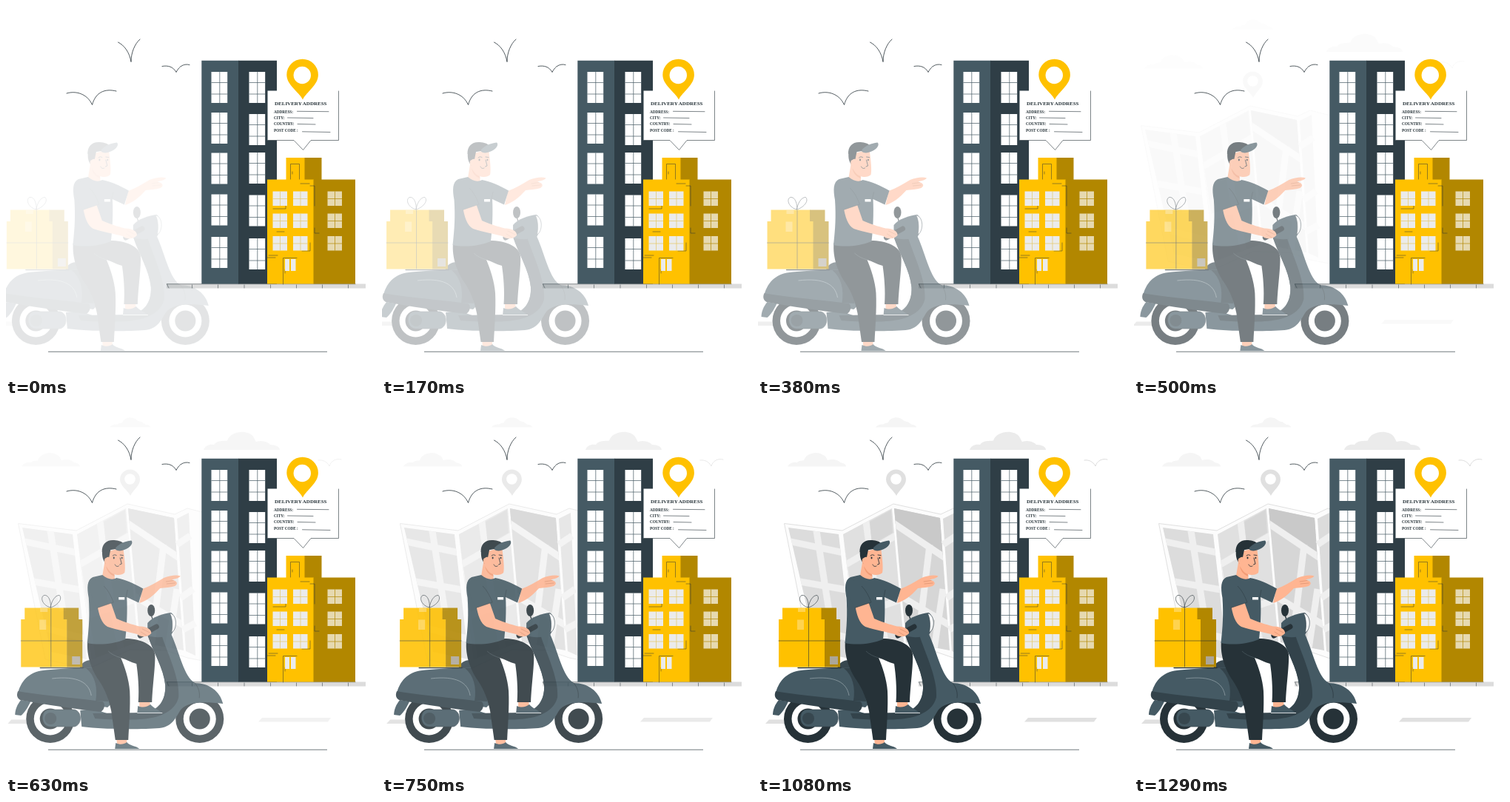
These frames come from a looping animation (500 px wide and 500 px high, 1330 ms). An HTML page:

```html
<!DOCTYPE html>
<html lang="en">
<head>
<meta charset="utf-8">
<title>Delivery</title>
<style>
html, body { margin: 0; width: 100%; height: 100%; overflow: hidden; background: #fff; }
svg { display: block; width: 100%; height: 100%; }
.line { fill: none; stroke: #263238; stroke-width: .8; stroke-linecap: round; stroke-linejoin: round; }
.road { fill: none; stroke: #efefef; stroke-width: 9; }
text { font-family: "Liberation Serif", "Times New Roman", serif; font-weight: bold; fill: #263238; }
</style>
</head>
<body>
<svg viewBox="0 0 500 500">
  <defs>
    <clipPath id="p1"><path d="M41 167L109 176L128 345L80 335Z"/></clipPath>
    <clipPath id="p2"><path d="M115 176L181 141L197 322L135 345Z"/></clipPath>
    <clipPath id="p3"><path d="M184 141L246 154L259 333L200 322Z"/></clipPath>
  </defs>

  <g id="back" opacity="0">
    <path fill="#f5f5f5" d="M40 84.5C42 80 48 78 53 79C55 76 60 77 62 76C65 66 81 63 88 69C93 71 93 75 94 76C104 73 110 77 111 79C117 80 119 82 119 84.5Z"/>
    <path fill="#f5f5f5" d="M159 31.5C161 28 166 27 169 27.5C173 25 175 26 176 25C178 18 190 16 195 21C197 23 200 24 202 24C205 26 207 27 208 28C212 28 214 30 214 31.5Z"/>
    <path fill="#ebebeb" d="M286 62C288 56 294 54 300 55C304 49 312 50 318 49.5C322 36 346 34 353 44C355 47 356 50 357 51C366 48 374 52 376 55C384 55 389 58 389 62Z"/>
    <path class="line" style="stroke:#d4d4d4" d="M441 76C447 75 453 78 456 84C458 77 465 73 472 75"/>
    <path fill="#e0e0e0" d="M365 424H458L454 429.5H360Z"/>
    <path fill="#fcfcfc" stroke="#e0e0e0" stroke-width="1" d="M35.5 161.5L114 171L183 135L247 149L264 141L300 150V350L264 343L235 333L187 332L130 358L72 345Z"/>
    <g clip-path="url(#p1)">
      <path fill="#dcdcdc" d="M30 150H130V350H30Z"/>
      <path class="road" d="M35 184L125 203M45 238L125 252M78 165L96 280M60 300L130 318"/>
    </g>
    <g clip-path="url(#p2)">
      <path fill="#e0e0e0" d="M100 130H200V350H100Z"/>
      <path class="road" d="M110 222L186 178M145 152L158 250L176 340M118 290L200 262M110 178L136 345"/>
      <path fill="#d6d6d6" d="M151 159L180 143L182 174L154 190Z"/>
    </g>
    <g clip-path="url(#p3)">
      <path fill="#d6d6d6" d="M180 130H264V345H180Z"/>
      <path fill="#c9c9c9" d="M180 140L262 154V212L182 160Z"/>
      <path class="road" d="M180 159L262 214M190 258L264 302M232 190L214 340M250 250L236 345"/>
    </g>
    <path fill="#dcdcdc" d="M250 155L266 147L275 340L262 334Z"/>
    <path class="road" d="M250 190L268 178M255 262L272 250M258 305L275 296"/>
    <path fill="#e0e0e0" d="M187 124C184 117 173 111 173 102A13.5 13.5 0 0 1 200 102C200 111 190 117 187 124Z"/>
    <circle cx="186.5" cy="101.5" r="7.3" fill="#fff"/>
  </g>

  <g id="town">
    <path class="line" d="M82 118C95 114 110 119 116.5 133.5C121 117 133 111 149 115M151.5 49C160 53 167 63 169 75.5C169 63 174 51 181 45M211 81.5C219 80 226 82 230 89.5C234 81 241 77.5 248 79.5"/>
    <path fill="#dcdcdc" d="M217 375.5H486V381.5H217Z"/>
    <path class="line" style="stroke-width:.5" d="M217.5 375.7H472M217.5 376L220 381M251.5 377V381M286.5 377V381M322 377V381M357.5 377V381M392.5 377V381M427.5 377V381M462.5 377V381"/>
    <path fill="#455a64" d="M264.3 73.7H314.5V375.5H264.3Z"/>
    <path fill="#2f3e46" d="M314 73.7H366V375.5H314Z"/>
    <g id="tall"></g>
    <path fill="#ffc100" d="M378.5 205H404V236H378.5Z"/>
    <path fill="#b28700" d="M403.5 205H426.5V236H403.5Z"/>
    <path fill="#ffc100" d="M353 234.5H416V375.5H353Z"/>
    <path fill="#b28700" d="M415.5 234.5H472V375.5H415.5Z"/>
    <path class="line" style="stroke-width:.5" d="M384.5 234V213.5H396.5V234M387 224V227M398 240H410M411 243H417V270M361 274H378V270M417 300V307H423M400 331H411V320M355 337H367M364 340H353.5M374.5 376V340.5H393M377 356V361M366 305H376"/>
    <g id="low"></g>
    <path fill="#ebebeb" d="M377 342H383V358H377ZM385 342H391.5V358H385Z"/>
    <path fill="#fff" d="M353.5 114.5H449.5V181.5H412L401.5 194.5L389 181.5H353.5Z"/>
    <path class="line" style="stroke-width:.6" d="M449.5 115V181.5H412L401.5 194.5L389 181.5H354"/>
    <text x="363" y="134" font-size="7">DELIVERY ADDRESS</text>
    <g font-size="5.2">
      <text x="362" y="145">ADDRESS:</text>
      <text x="362" y="153">CITY:</text>
      <text x="362" y="161">COUNTRY:</text>
      <text x="362" y="170">POST CODE :</text>
    </g>
    <path class="line" style="stroke-width:.6" d="M393.5 142.3L436 142.7M380.5 151L415 151.5M394 159.5L418 160M400.5 169.8L438 170.5"/>
    <path fill="#ffc100" d="M401 126.5C396 116 379.3 107 379.3 93A21.3 21.3 0 0 1 421.9 93C421.9 107 406 116 401 126.5Z"/>
    <circle cx="400.3" cy="93.5" r="11.7" fill="#fff"/>
  </g>

  <path d="M57 467.2H434" stroke="#4c575c" stroke-width=".8"/>

  <g id="rider">
    <path fill="#e0e0e0" d="M15 426.5H50L46 432H10Z"/>

    <g id="wheels"></g>
    <!-- scooter -->
    <path fill="#455a64" d="M28 400L41 402C37 411 32 418 28 421L20 420C20 413 23 406 28 400Z"/>
    <path fill="#455a64" stroke="#37474f" stroke-width=".7" d="M66 413H100C111 415 111 434 100 436H70C54 438 54 413 66 413Z"/>
    <circle cx="68" cy="425" r="8" fill="#37474f"/>
    <path fill="#455a64" d="M199 312C206 334 221 357 223 380C224 402 212 414 196 417L150 420L126 412L108 414L110 436C140 440 190 440 215 438C235 436 238 420 245 412C255 402 275 402 301 405C297 388 282 377 263 377C248 368 243 338 231 311Z"/>
    <path fill="#33434b" d="M199 312C206 334 221 357 223 380C224 402 212 414 200 417L125 418L128 425C160 428 190 427 205 424C225 420 238 410 241 396C243 370 225 335 218 312Z"/>
    <path class="line" style="stroke-width:.6" d="M263 377C268 383 270 390 269 397"/>
    <path fill="#37474f" d="M107 358C109 350 115 346 123 346H158V362H107Z"/>
    <path fill="#455a64" d="M24 390C29 372 41 361 62 359.5C90 357 118 356 140 357C160 372 160 398 145 410Z"/>
    <path fill="#33434b" d="M116 357H142L146 402L129 401C132 383 128 367 116 357Z"/>
    <path fill="#33434b" d="M24 388C50 393 80 395 138 402C142 404 142 412 136 416C100 412 60 406 27 400C22 397 22 392 24 388Z"/>
    <path fill="none" stroke="#9aa8ae" stroke-width=".7" d="M70 371C104 367 120 376 123 394"/>
    <path class="line" style="stroke-width:1.3" d="M54 356.5H112M204 285L208 298"/>
    <ellipse cx="204" cy="279" rx="5" ry="8" fill="#263238"/>
    <path fill="#455a64" d="M199 296C205 288 220 283 231 282C238 288 238 302 231 312C220 316 208 316 199 313Z"/>
    <path fill="#fff" stroke="#37474f" stroke-width=".7" d="M229 282.5C240 285 239 305 231.5 309C233 300 233 290 229 282.5Z"/>
    <path class="line" style="stroke-width:7" d="M189 313L211 301"/>

    <!-- parcels -->
    <path fill="#ffc100" d="M33 275.5H86V292H33ZM28 291H90.5V355.5H28Z"/>
    <path fill="#b28700" d="M85.5 275.5H106V291H85.5ZM90 291H111V355.5H90Z"/>
    <path fill="#ffd34f" d="M53 291.5H62V305H53ZM54 276H64V281H54Z"/>
    <path fill="#aca698" d="M97 341H108V352H97Z"/>
    <path class="line" style="stroke-width:.6" d="M28 320H111M68.5 276V355M68 275C58 273 53 262 59 258.5C66 257 69 269 68 275C69 267 74 258 80 258.5C85 264 76 273 68 275"/>

    <!-- legs and feet -->
    <path fill="#ffb592" d="M188 400H202L203 411H188ZM157 451H171V461H158Z"/>
    <path fill="#455a64" d="M186 408C193 411 199 409 203 406C207 411 214 413 219 418H185ZM156 458C162 461 167 460 171 457C175 462 184 462 188 466H155Z"/>
    <path stroke="#d5d9db" stroke-width="1" d="M185 417.5H219"/>
    <path fill="#263238" d="M118 320C140 325 158 322 168 317C188 317 207 324 209 338C210 352 206 378 205 403H186.5C188 384 186 365 184 351C176 349 170 345 163 343C168 355 174 372 175 388C176 410 174 434 173 454H155.5L150 415C147 400 142 386 133 373C124 360 116 340 118 320Z"/>
    <path fill="none" stroke="#5b6a71" stroke-width=".5" d="M163 343C156 341 150 338 146 334"/>

    <!-- pointing arm -->
    <path fill="#ffb592" d="M192 250C203 246 212 240 221 235C229 232 238 230.5 243.5 232.5C241 236 236 236 232 237.5C239 239 241 243 236 246C230 248 222 248 216 249C207 259 198 266 188 269Z"/>
    <path class="line" style="stroke:#c9805f;stroke-width:.5" d="M224 240L234 238.5M225 243L236 242"/>
    <!-- head -->
    <path fill="#ffb592" d="M142 200L166 194C168 208 169.5 222 168 228C165 231.500 158 231.500 154 230L155 238C148 240 141 237 138 232L141 214Z"/>
    <path fill="#f29c76" d="M143 219C147 226 150 229 154 230L154.500 233C147 230 144 225 143 219Z"/>
    <path fill="#263238" d="M138 197H149L147 207C143 206 142 209 143 216C139 212 137 206 138 197Z"/>
    <ellipse cx="143.500" cy="212" rx="2.800" ry="4" fill="#ffb592"/>
    <path fill="#263238" d="M137.500 200C137 190 143 184 152 184C158 184 163 185 166 188L160 196C152 196 145 198 137.500 200Z"/>
    <path fill="#455a64" d="M156 194C162 188 168 186 177 184.500C180 187 177 193 170 196C164 199 159 199 156 197Z"/>
    <path class="line" style="stroke-width:.9" d="M152 205C153.500 203.500 155 203.500 157 204.500M162 204L166 204.500M162 208L164 216L161.500 217M155 217C156 219.500 158 220 160 219"/>
    <path fill="#263238" d="M152.500 208A1 1.400 0 1 0 154.500 208A1 1.400 0 1 0 152.500 208M163.500 208A.9 1.300 0 1 0 165.300 208A.9 1.300 0 1 0 163.500 208"/>
    <!-- shirt and near arm -->
    <path fill="#455a64" d="M138 231C145 237 152 238 157 235C169 237 181 243 193 249.500L187 268.500L171 261C172 280 171 302 169 318C152 325 132 326 117.500 323C120 300 121 285 119.500 262C117 248 117 238 125 234Z"/>
    <path fill="#ffb592" d="M131 271C133 284 137 297 145 301C160 306 174 308 185 311C190 316 200 315 204 310C205 304 196 300 188 300.500C178 298 166 294 157 290L149 267Z"/>
    <path class="line" style="stroke:#c9805f;stroke-width:.5" d="M192 304L202 309M190 308L198 313"/>
    <path fill="#455a64" d="M124 236C138 240 147 252 153 268L131 275.500C124 264 118 248 124 236Z"/>
    <path fill="none" stroke="#2f3e46" stroke-width=".6" d="M140 246C146 252 150 260 153 268L131 275.500M170 261L172 251"/>
    <path fill="#fff" d="M160 261H168V264.500H160Z"/>
  </g>
</svg>
<script>
const LOOP = 1330, TICK = 1000 / 24;
const el = id => document.getElementById(id);
const rect = (x, y, w, h, fill) => `<rect x="${x}" y="${y}" width="${w}" height="${h}" fill="${fill}"/>`;
const bars = (d, color, w) => `<path d="${d}" fill="none" stroke="${color}" stroke-width="${w}"/>`;

const tallWindow = (x, y) => rect(x, y, 21.7, 42, '#fff') +
  bars(`M${x + 11.3} ${y}v42M${x} ${y + 14.5}h22M${x} ${y + 30}h22`, '#455a64', .7);

const lowWindow = (x, y, glass, bar) => rect(x, y, 19.5, 19.5, glass) +
  bars(`M${x + 10} ${y}v19.5M${x} ${y + 10}h19.5`, bar, .7);

const wheel = (x, y) => [[32.5, '#263238'], [22, '#fff'], [14, '#263238']]
  .map(([r, c]) => `<circle cx="${x}" cy="${y}" r="${r}" fill="${c}"/>`).join('');

el('tall').innerHTML =
  [89, 144, 198.5, 254.5, 312].map(y => tallWindow(277.5, y)).join('') +
  [89, 146, 198, 255.5, 314].map(y => tallWindow(328.5, y)).join('');
el('low').innerHTML = [250.5, 280.5, 311].map(y =>
  lowWindow(360.5, y, '#ebebeb', '#e4c766') +
  lowWindow(388, y, '#ebebeb', '#e4c766') +
  lowWindow(434.5, y, '#e6d9b0', '#b28700')).join('');
el('wheels').innerHTML = wheel(67.5, 425.5) + wheel(269.5, 425.5);

const clamp = v => Math.max(0, Math.min(1, v));

// linear track through [time, value] points
function track(points, t) {
  let [t0, v0] = points[0];
  for (const [t1, v1] of points) {
    if (t < t1) return v0 + (v1 - v0) * clamp((t - t0) / (t1 - t0));
    [t0, v0] = [t1, v1];
  }
  return v0;
}

const drift = [[417, -31], [500, -26], [630, -18.7], [830, -6], [920, -2], [1083, 0], [1126, 0], [1292, -2]];

function place(node, x, alpha) {
  node.setAttribute('transform', `translate(${x.toFixed(2)} 0)`);
  node.setAttribute('opacity', alpha.toFixed(3));
}

const back = el('back'), rider = el('rider');

function draw(ms) {
  const t = Math.floor((ms + 4) / TICK) * TICK;
  const ride = clamp((t + 125) / 1000);
  place(rider, -31 * (1 - ride), ride);
  place(back, track(drift, t), clamp((t - 417) / 500));
}

const start = performance.now();
function frame() {
  draw((performance.now() - start) % LOOP);
  requestAnimationFrame(frame);
}
frame();
</script>
</body>
</html>
```
